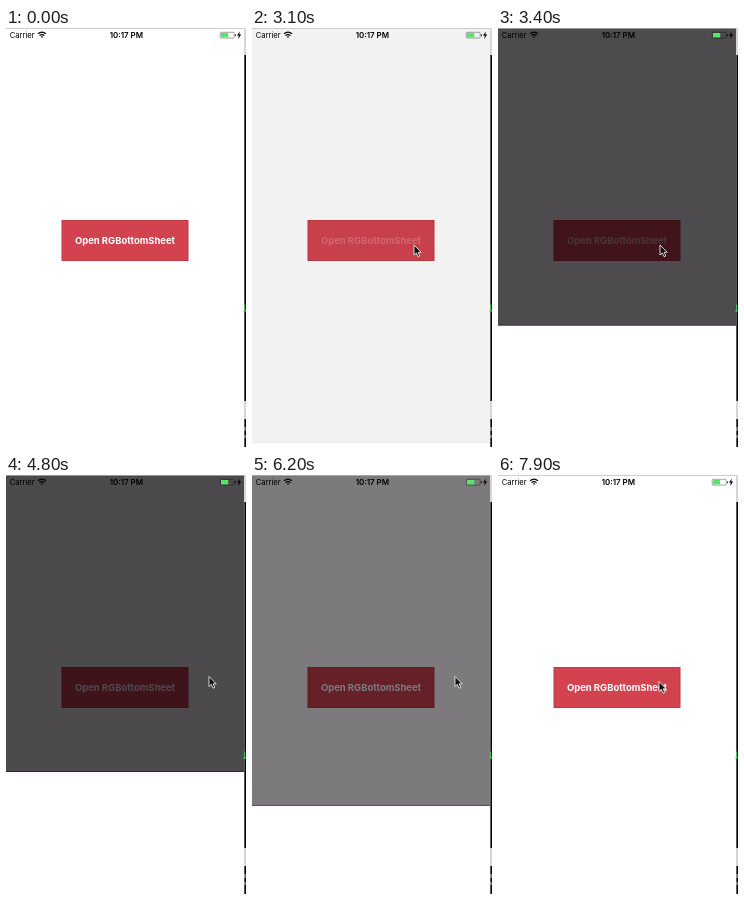
Animation of 240 by 419 pixels, one loop 8000 ms. Source, as an HTML page:

```html
<!DOCTYPE html>
<html lang="en">
<head>
<meta charset="utf-8">
<title>Bottom sheet</title>
<style>
  html, body { margin: 0; width: 100%; height: 100%; overflow: hidden; background: #fff; }
  svg { display: block; width: 100vw; height: 100vh; }
  text { font-family: Inter, Roboto, sans-serif; }
</style>
</head>
<body>
<svg viewBox="0 0 240 419" preserveAspectRatio="none">
  <rect width="240" height="419" fill="#fff"/>
  <rect x="56" y="192.5" width="126" height="40" fill="#d2434f" stroke="#c23843"/>
  <text id="label" x="119" y="216.2" font-size="9.45" font-weight="700" text-anchor="middle" fill="#fff">Open RGBottomSheet</text>
  <rect id="scrim" width="238" height="419" fill="#040005"/>
  <g id="sheet">
    <rect id="edge" y="-1" width="238" height="1" fill="#1c0a1c"/>
    <rect width="238" height="130" fill="#fff"/>
  </g>

  <!-- status bar -->
  <text x="3.7" y="9.8" font-size="7.6">Carrier</text>
  <g fill="none" stroke="#000" stroke-width="1.2">
    <path d="M32 5.8Q36 2.4 40 5.8M33.5 7.6Q36 5.5 38.5 7.6"/>
    <rect x="214.2" y="4.3" width="14" height="5.8" rx="1.2" stroke-width=".7" stroke-opacity=".5"/>
  </g>
  <path d="M34.8 8.8Q36 7.8 37.2 8.8L36 10Z"/>
  <text x="120.3" y="10" font-size="7.9" font-weight="600" text-anchor="middle">10:17 PM</text>
  <rect x="215" y="5" width="7.2" height="4.4" fill="#5be46b"/>
  <path d="M228.9 6.2h.8v2h-.8zM233.8 3.5L231 7.6h1.8L232.2 11L235.2 6.6h-1.9Z"/>

  <!-- window edges -->
  <rect width="240" height=".7" fill="#bbb"/>
  <rect x="238" width="2" height="419" fill="#d6d6d6"/>
  <path d="M238.4 27h1.6V373h-1.6zM238.4 391h1.6v28h-1.6z" fill="#050505"/>
  <path d="M238.7 276.5V283M237.2 283H240" fill="none" stroke="#45d85a"/>
  <path d="M239 399v4M239 407v3" stroke="#ccc"/>

  <path id="cursor" d="M0 0V10L2.3 7.9L4 11.7L5.7 11L4.2 7.3H7.2Z" fill="#111" stroke="#fff" stroke-width=".8"/>
</svg>
<script>
const LOOP = 8000, OPEN_Y = 297, CLOSED_Y = 424;
const [label, scrim, sheet, edge, cursor] =
  ["label", "scrim", "sheet", "edge", "cursor"].map(id => document.getElementById(id));

const progress = (t, start, length) => Math.min(1, Math.max(0, (t - start) / length));
const ease = (t, start, length) => {
  const p = progress(t, start, length);
  return p * p * (3 - 2 * p);
};
const place = (el, x, y) => el.setAttribute("transform", `translate(${x} ${y})`);
const fade = (el, opacity) => el.setAttribute("opacity", opacity);

// Cursor moves: start time, length, x, y of the destination
const moves = [
  [50, 850, 162, 217],
  [3700, 1000, 203, 201.5],
  [6850, 800, 161, 206.5]
];

function draw(t) {
  const open = ease(t, 3040, 378) - ease(t, 6062, 409);
  place(sheet, 0, CLOSED_Y + (OPEN_Y - CLOSED_Y) * open);
  fade(scrim, 0.71 * open);
  fade(edge, 0.5 * open);

  // The label dims while pressed, then fades back
  fade(label, t < 2850 ? 1 : 0.22 + 0.78 * ease(t, 3200, 400));

  let x = 246, y = 325;
  for (const [start, length, toX, toY] of moves) {
    const p = ease(t, start, length);
    x += (toX - x) * p;
    y += (toY - y) * p;
  }
  place(cursor, x, y);
}

const origin = performance.now();
function tick() {
  draw((performance.now() - origin) % LOOP);
  requestAnimationFrame(tick);
}
tick();
</script>
</body>
</html>
```
